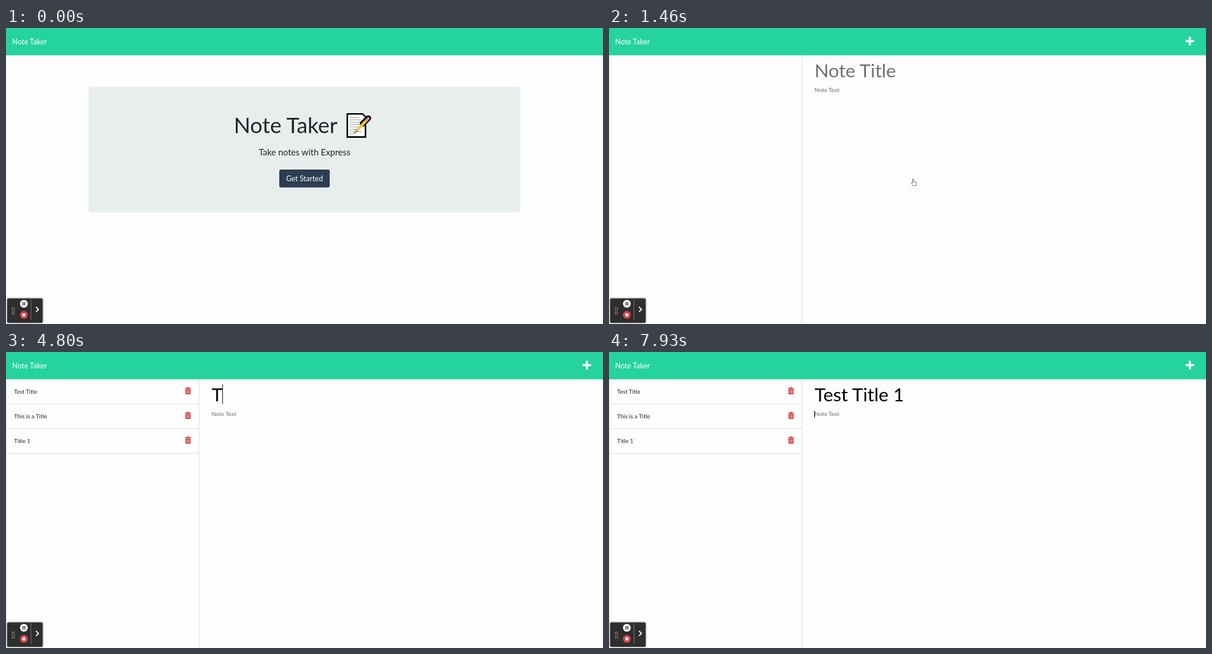
Write an HTML page that moves like this. It is 1018 by 504 pixels and loops after 8000 ms.

```html
<!DOCTYPE html>
<html lang="en">
<head>
<meta charset="utf-8">
<title>Note Taker</title>
<style>
  html, body { margin: 0; width: 100%; height: 100%; overflow: hidden; background: #fdfdfd; }
  svg { display: block; width: 1018px; height: 504px; }
  text { font-family: Lato, sans-serif; font-size: 9.94px; fill: #212529; white-space: pre; }
  .brand { font-size: 12.43px; fill: #fff; }
  .hero { font-size: 37.11px; }
  .lead { font-size: 14.91px; }
  .mid { text-anchor: middle; }
  .title { font-size: 31.81px; }
  .hint { fill: #707070; }
  .rule { stroke: #dedede; fill: none; }
</style>
</head>
<body>
<svg viewBox="0 0 1018 504">
  <defs>
    <filter id="shadow" x="-20%" y="-20%" width="140%" height="140%">
      <feDropShadow dx="0" dy="0" stdDeviation="1.6" flood-opacity=".6"/>
    </filter>
    <g id="trash" fill="#d63843">
      <path d="M305.3 61.2h2.9l.8-1.2h2.8l.8 1.2h2.9v1.6h-10.2z"/>
      <path d="M306 63.6h8.8v7.2q0 1.2-1.2 1.2h-6.4q-1.2 0-1.2-1.2z"/>
      <path d="M308.2 65.2v5.2M310.4 65.2v5.2M312.6 65.2v5.2" stroke="#fdfdfd" stroke-width=".8"/>
    </g>
  </defs>

  <rect width="1018" height="504" fill="#fdfdfd"/>
  <rect width="1018" height="46.5" fill="#25d39d"/>
  <text class="brand" x="10.6" y="27.7">Note Taker</text>

  <g id="home">
    <rect x="141" y="100" width="736" height="214" rx="3" fill="#e8eeee"/>
    <text class="hero" x="388.5" y="179">Note Taker</text>
    <g stroke-linecap="round">
      <path d="M582 146.2h26l5 5v34.4h-31z" fill="#fff" stroke="#000" stroke-width="2.6" stroke-linecap="butt"/>
      <path d="M586.5 152.5h15M586.5 156.5h19M586.5 160.5h19M586.5 164.5h16M586.5 168.5h19M586.5 172.5h16M586.5 176.5h19M586.5 180.5h6" stroke="#999"/>
      <path d="M608 163L618 153.5" stroke="#000" stroke-width="9.5"/>
      <path d="M593.5 179L597 172.5L600 175.5z" fill="#f3d9a4" stroke="#333" stroke-width=".8"/>
      <path d="M599 173.5L614 158" stroke="#f6c83a" stroke-width="4.6" stroke-linecap="butt"/>
      <path d="M614 158L616 156" stroke="#aab4b8" stroke-width="4.6" stroke-linecap="butt"/>
      <path d="M616.7 155.2L618 153.8" stroke="#e58b80" stroke-width="4.4"/>
    </g>
    <text class="lead mid" x="509" y="216.7">Take notes with Express</text>
    <rect id="focus" x="464.7" y="239.8" width="88.6" height="33" rx="4" fill="#97a3aa"/>
    <rect id="button" x="466" y="241.1" width="86" height="30.4" rx="3"/>
    <text class="brand mid" x="509" y="261.1">Get Started</text>
  </g>

  <g id="notes">
    <path d="M990.5 16.4v11.8M984.6 22.3h11.8" stroke="#f1f5f4" stroke-width="3.8" stroke-linecap="round"/>
    <path class="rule" d="M.5 47V504M329 47V504"/>
    <g id="list"></g>
    <text id="title" class="title" x="350.5" y="83.7"></text>
    <text class="hint" x="350.5" y="109.2">Note Text</text>
    <rect id="caret" width="1"/>
  </g>

  <circle id="ripple" fill="none" stroke="#e4505c" stroke-width="1.3"/>
  <path id="hand" d="M-1 7V1a1 1 0 0 1 2 0V4.5L5 5.3Q6 5.6 6 7L5 11.5H0L-3 7.5Q-3.2 6-1 7Z" fill="#fff" stroke="#444" stroke-width=".8" stroke-linejoin="round"/>
  <path id="arrow" d="M0 0V11L2.6 8.6L4.4 12.4L6 11.6L4.3 8H7.8Z" fill="#fff" stroke="#222" stroke-width=".8"/>
  <path id="beam" d="M-2-5.5H2M0-5.5V5.5M-2 5.5H2" stroke="#222" stroke-width=".8"/>

  <g id="recorder">
    <rect x="2" y="460.5" width="60.5" height="41.5" rx="2" fill="#2d2d2d" filter="url(#shadow)"/>
    <path d="M10.8 476.5v11M14 476.5v11" stroke="#ccc" stroke-width="1.5" stroke-dasharray="1.4 1.8"/>
    <circle cx="30.5" cy="469.6" r="6.7" fill="#f5f5f5"/>
    <path d="M29 466.6v6M32 466.6v6" stroke="#2d2d2d" stroke-width="1.5"/>
    <circle cx="30.5" cy="488.4" r="6.7" fill="#d8434f"/>
    <rect x="28" y="486" width="5" height="5" rx=".6" fill="#fff"/>
    <path d="M42.6 461.5v35.5" stroke="#777"/>
    <path d="M51.2 475l4.2 4.2-4.2 4.2" fill="none" stroke="#fff" stroke-width="1.8"/>
  </g>
</svg>
<script>
const LOOP = 8000, BLINK = 530;
const PAGE_AT = 1460, LIST_AT = 1530, TAB_AT = 7500;
const CLICKS = [[1080, 519, 258], [2900, 454, 76]];
const TYPED = "Test Title 1";
const KEYS = [4730, 4990, 5180, 5360, 5540, 5760, 5930, 6080, 6240, 6400, 6850, 7150];
const HOME_PATH = [[600, 70, 470], [960, 518.5, 257]];
const NOTE_PATH = [[2050, 518.5, 262], [2750, 454, 76]];

const $ = id => document.getElementById(id);
const show = (id, on) => { $(id).style.display = on ? "" : "none"; };
const set = (id, attrs) => {
  for (const name in attrs) $(id).setAttribute(name, attrs[name]);
};

$("list").innerHTML = ["Test Title", "This is a Title", "Title 1"].map((name, i) =>
  `<g transform="translate(0 ${i * 42})">
    <text x="13.8" y="71">${name}</text><use href="#trash"/>
    <path class="rule" d="M0 88.4H329"/>
  </g>`).join("");

function along([[t0, x0, y0], [t1, x1, y1]], t) {
  const p = Math.min(1, Math.max(0, (t - t0) / (t1 - t0)));
  const e = p * p * (3 - 2 * p);
  return [x0 + (x1 - x0) * e, y0 + (y1 - y0) * e];
}

function drawPointer(t) {
  const [x, y] = along(t < PAGE_AT + 140 ? HOME_PATH : NOTE_PATH, t);
  const overButton = x > 466 && y < 271;
  const kind = t < HOME_PATH[0][0] || t > CLICKS[1][0] ? "" :
    t >= PAGE_AT + 140 ? "beam" : overButton ? "hand" : "arrow";
  for (const id of ["hand", "arrow", "beam"]) show(id, id === kind);
  if (kind) set(kind, { transform: `translate(${x} ${y})` });

  const pressed = t >= CLICKS[0][0];
  show("focus", pressed);
  set("button", { fill: pressed ? "#1a2631" : overButton ? "#1e2b37" : "#2c3e50" });

  const click = CLICKS.find(([at]) => t >= at && t < at + 300);
  show("ripple", click);
  if (click) {
    const p = (t - click[0]) / 300;
    set("ripple", { cx: click[1], cy: click[2], r: 7 + 15 * p, opacity: Math.min(1, 3 * (1 - p)) });
  }
}

function drawNote(t) {
  const typed = TYPED.slice(0, KEYS.filter(at => at <= t).length);
  const title = $("title");
  title.textContent = typed || "Note Title";
  title.style.fill = typed ? "#000" : "#707070";

  const lastInput = [CLICKS[1][0], ...KEYS, TAB_AT].filter(at => at <= t).pop();
  const lit = Math.floor((t - lastInput) / BLINK) % 2 === 0;
  show("caret", lastInput && lit);
  if (t >= TAB_AT) set("caret", { x: 350, y: 100, height: 12 });
  else set("caret", { x: 350 + (typed ? title.getComputedTextLength() : 0), y: 55, height: 33.5 });
}

function draw(t) {
  show("home", t < PAGE_AT);
  show("notes", t >= PAGE_AT);
  show("list", t >= LIST_AT);
  drawPointer(t);
  drawNote(t);
}

let start;
function tick(now) {
  start ??= now;
  draw((now - start) % LOOP);
  requestAnimationFrame(tick);
}
draw(0);
requestAnimationFrame(tick);
</script>
</body>
</html>
```
